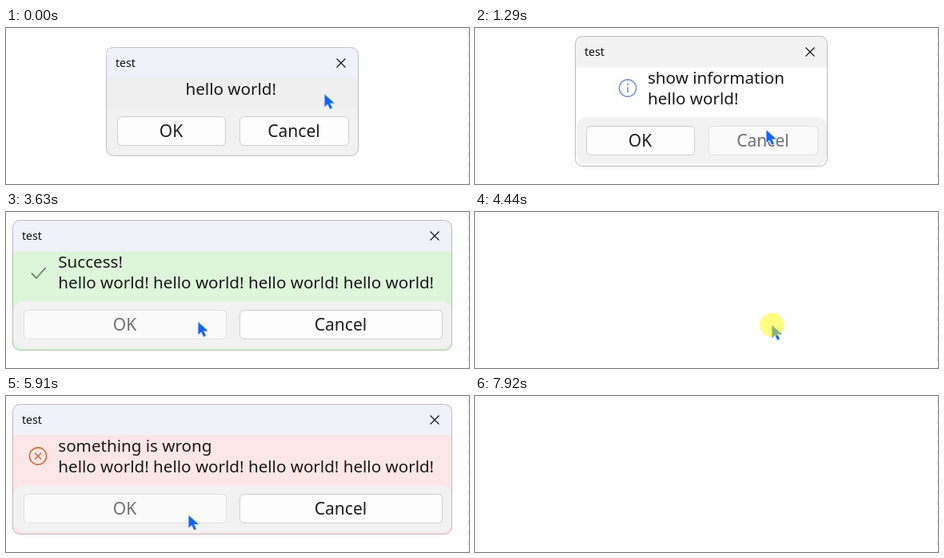
Animation of 579x196 px, one loop 8690 ms. Source, as an HTML page with a canvas:

```html
<!DOCTYPE html>
<html lang="en">
<head>
<meta charset="utf-8">
<title>Message dialogs</title>
<style>
html, body { margin: 0; width: 100%; height: 100%; overflow: hidden; background: #fefefe; }
canvas { display: block; }
</style>
</head>
<body>
<canvas id="stage" width="579" height="196"></canvas>
<script>
const W = 579, H = 196, LOOP = 8690, PAGE = '#fefefe';
const ctx = document.getElementById('stage').getContext('2d');
const FONT = '"Noto Sans", "Open Sans", sans-serif';

// Each dialog fades in between open and ready; close is the click that ends it.
const narrow = { x: 125, y: 10, w: 316, h: 164, buttons: [[139, 136], [292, 137]] };
const wide = { x: 8, y: 10, w: 550, h: 164, buttons: [[22, 254], [292, 254]] };
const long = 'hello world! hello world! hello world! hello world!';
const dialogs = [
  { ...narrow, y: 24, h: 137, open: -1, ready: 0, close: 1190, bar: '#f1f2f9', fill: '#efefef',
    border: '#c2c2c4', textX: 224.5, lines: ['hello world!'] },
  { ...narrow, open: 1225, ready: 1290, close: 2640, bar: '#f2f2f2', fill: '#fefefe',
    border: '#bcbcbc', textX: 216, lines: ['show information', 'hello world!'], icon: infoIcon },
  { ...wide, open: 2685, ready: 2750, close: 4440, bar: '#f1f2f9', fill: '#def5dc',
    border: '#b7beb7', textX: 65.3, lines: ['Success!', long], icon: checkIcon },
  { ...narrow, open: 4500, ready: 4570, close: 5720, bar: '#f1f2f9', fill: '#fff1cc',
    border: '#c0bcb2', textX: 222.6, lines: ['this is a warning', 'hello world!'], icon: warnIcon },
  { ...wide, open: 5790, ready: 5910, close: 7350, bar: '#f1f2f9', fill: '#fde6e7',
    border: '#c4b9ba', textX: 65.3, lines: ['something is wrong', long], icon: errorIcon }
];

// Pointer keys: time, x, y
const path = [
  [0, 398, 83], [270, 398, 83], [680, 368, 124.5], [850, 368, 124.5], [920, 364, 128],
  [1870, 364, 128], [2270, 243, 143], [3615, 243, 143], [3630, 240, 138], [3730, 233, 132],
  [3900, 233, 132], [4140, 371, 142], [5020, 371, 142], [5390, 228, 149.5],
  [6370, 228, 149.5], [6820, 408, 146], [7385, 408, 146], [7420, 402, 137],
  [7840, 402, 137], [7920, 436, 158]
];
const CLICK = 70, POINTER_END = 7920;

const ease = p => p * p * (3 - 2 * p);

function pointerAt(t) {
  const i = path.findIndex(k => k[0] > t);
  if (i < 0) return path[path.length - 1].slice(1);
  const [t0, x0, y0] = path[i - 1], [t1, x1, y1] = path[i];
  const p = ease((t - t0) / (t1 - t0));
  return [x0 + (x1 - x0) * p, y0 + (y1 - y0) * p];
}

function box(x, y, w, h, r, fill, stroke) {
  ctx.beginPath();
  ctx.roundRect(x, y, w, h, r);
  if (fill) { ctx.fillStyle = fill; ctx.fill(); }
  if (stroke) { ctx.strokeStyle = stroke; ctx.lineWidth = 1; ctx.stroke(); }
}

function line(color, width, ...points) {
  ctx.beginPath();
  points.forEach(([x, y]) => ctx.lineTo(x, y));
  ctx.strokeStyle = color;
  ctx.lineWidth = width;
  ctx.stroke();
}

function ring(x, y, r, color, width) {
  ctx.beginPath();
  ctx.arc(x, y, r, 0, 7);
  ctx.strokeStyle = color;
  ctx.lineWidth = width;
  ctx.stroke();
}

function dot(x, y, r, color) {
  ctx.beginPath();
  ctx.arc(x, y, r, 0, 7);
  ctx.fillStyle = color;
  ctx.fill();
}

function text(s, x, y, size, color, align = 'left') {
  ctx.font = `${size}px ${FONT}`;
  ctx.textAlign = align;
  ctx.fillStyle = color;
  ctx.fillText(s, x, y);
}

function infoIcon() {
  const c = '#7c98e2';
  ring(191, 75.5, 10.6, c, 1.6);
  dot(191, 70.8, 1.3, c);
  line(c, 1.8, [191, 74.5], [191, 81]);
}

function checkIcon() {
  line('#5f8a5b', 1.8, [32, 77], [38, 83], [49.5, 70]);
}

function warnIcon() {
  const c = '#c4914a';
  ctx.beginPath();
  ctx.moveTo(197.5, 65.5);
  ctx.lineTo(207.8, 85.8);
  ctx.lineTo(187.2, 85.8);
  ctx.closePath();
  ctx.strokeStyle = c;
  ctx.lineWidth = 1.7;
  ctx.lineJoin = 'round';
  ctx.stroke();
  line(c, 1.8, [197.5, 72.5], [197.5, 79]);
  dot(197.5, 82.2, 1.2, c);
}

function errorIcon() {
  const c = '#cb7040';
  ring(40, 75.5, 10.6, c, 1.6);
  line(c, 1.6, [36, 71.5], [44, 79.5]);
  line(c, 1.6, [44, 71.5], [36, 79.5]);
}

function button(label, x, y, w, [px, py]) {
  const over = px >= x && px < x + w && py >= y && py < y + 37;
  box(x + .5, y + .5, w - 1, 36, 5, over ? '#fafafa' : '#fdfdfd', over ? '#e3e3e3' : '#cfcfcf');
  text(label, x + w / 2 - .5, y + 26, 21, over ? '#707070' : '#1c1c1c', 'center');
}

function drawDialog(d, t, pointer) {
  const { x, y, w, h } = d, bottom = y + h;
  const shown = Math.min(1, (t - d.open) / (d.ready - d.open));
  const scale = .96 + .04 * shown;
  ctx.save();
  ctx.translate(x + w / 2, y + h / 2);
  ctx.scale(scale, scale);
  ctx.translate(-x - w / 2, -y - h / 2);

  ctx.save();
  ctx.beginPath();
  ctx.roundRect(x, y, w, h, 9);
  ctx.clip();
  ctx.fillStyle = d.fill;
  ctx.fillRect(x, y, w, h);
  ctx.fillStyle = d.bar;
  ctx.fillRect(x, y, w, 39.5);
  box(x + 2, bottom - 62, w - 3, 59, 12, '#f2f2f2');
  ctx.restore();
  box(x + .5, y + .5, w - 1, h - 1, 9, null, d.border);

  text('test', x + 12, y + 25, 14, '#111');
  const cx = x + w - 22, cy = y + 20;
  line('#1a1a1a', 1.2, [cx - 5.5, cy - 5.5], [cx + 5.5, cy + 5.5]);
  line('#1a1a1a', 1.2, [cx + 5.5, cy - 5.5], [cx - 5.5, cy + 5.5]);

  if (d.icon) d.icon();
  d.lines.forEach((s, i) => text(s, d.textX, y + 60 + i * 26.4, 20.6, '#1a1a1a'));
  d.buttons.forEach(([bx, bw], i) =>
    button(i ? 'Cancel' : 'OK', bx, bottom - 51 + (d.icon ? 0 : 1), bw, pointer));

  if (shown < 1) {
    ctx.globalAlpha = 1 - shown;
    ctx.fillStyle = PAGE;
    ctx.fillRect(x - 1, y - 1, w + 2, h + 2);
  }
  ctx.restore();
}

function drawPointer([x, y]) {
  ctx.save();
  ctx.translate(x, y);
  ctx.beginPath();
  [[.5, .5], [.5, 16], [4.3, 12.6], [7.2, 18.8], [9.8, 17.6], [7, 11.6], [12.4, 11.4]]
    .forEach(([a, b]) => ctx.lineTo(a, b));
  ctx.closePath();
  ctx.lineJoin = 'round';
  ctx.strokeStyle = '#dbe6fb';
  ctx.lineWidth = 1.8;
  ctx.stroke();
  ctx.fillStyle = '#1263fa';
  ctx.fill();
  ctx.restore();
}

function draw(t) {
  ctx.fillStyle = PAGE;
  ctx.fillRect(0, 0, W, H);
  ctx.setLineDash([6, 6.6]);
  line('#e6e6e6', 1, [578.5, 5], [578.5, H]);
  ctx.setLineDash([]);

  const pointer = pointerAt(t);
  const dialog = dialogs.find(d => t >= d.open && t < d.close);
  if (dialog) drawDialog(dialog, t, pointer);
  if (t < POINTER_END) drawPointer(pointer);
  if (dialogs.some(d => t >= d.close && t < d.close + CLICK)) {
    dot(pointer[0], pointer[1], 15, 'rgba(255, 255, 0, .5)');
  }
}

const start = performance.now();
function tick() {
  draw((performance.now() - start) % LOOP);
  requestAnimationFrame(tick);
}
tick();
</script>
</body>
</html>
```
